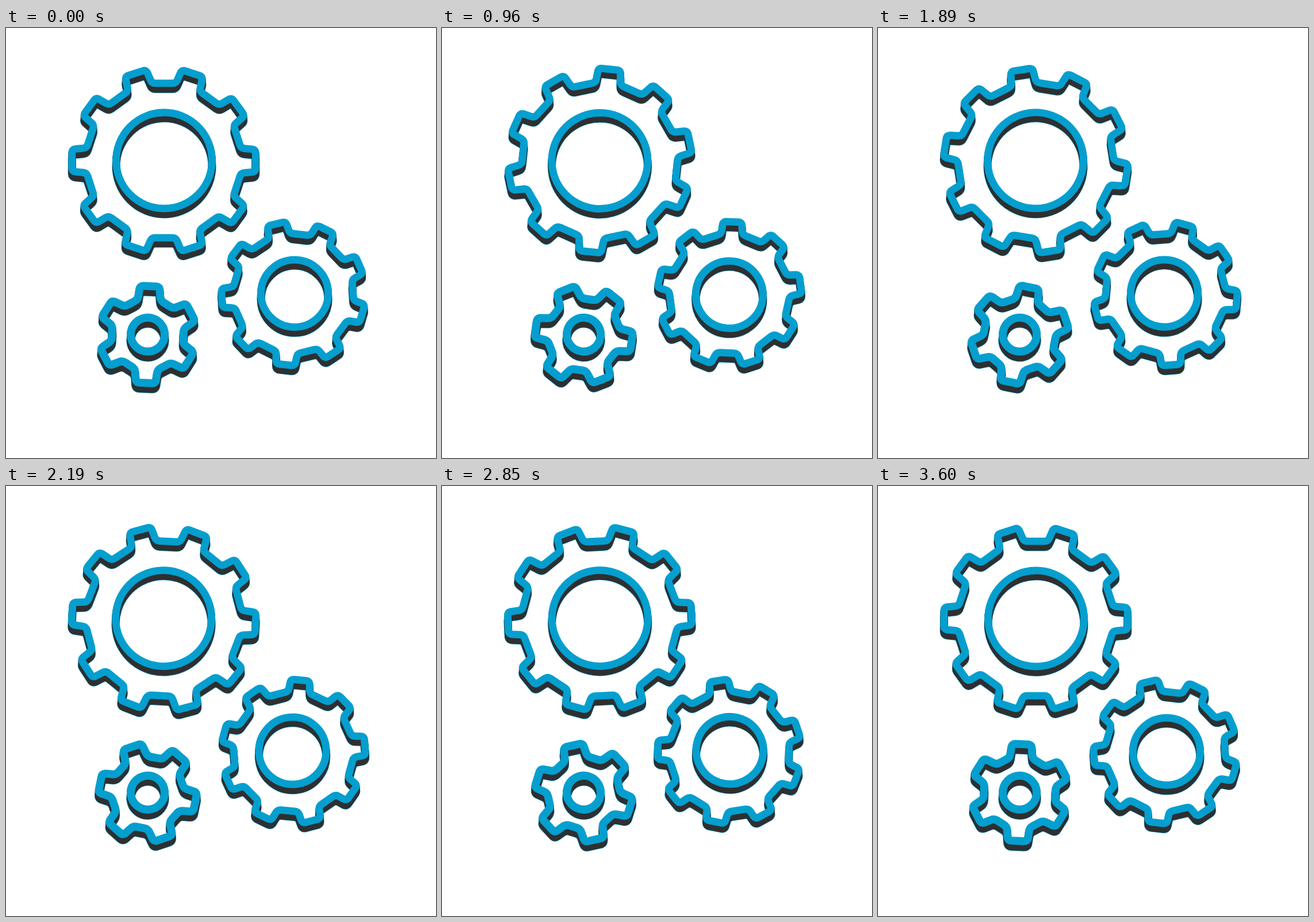
An HTML page that plays this animation: 748 by 748 pixels, repeating every 3630 ms.

```html
<!DOCTYPE html>
<html lang="en">
<head>
<meta charset="utf-8">
<title>Gears</title>
<style>
  html, body { margin: 0; width: 100%; height: 100%; overflow: hidden; background: #fff; }
  svg { display: block; width: 100vw; height: 100vh; }
</style>
</head>
<body>
<svg id="stage" viewBox="0 0 748 748" fill="none" stroke-linejoin="round"></svg>
<script>
const NS = 'http://www.w3.org/2000/svg';
const BLUE = '#049fcf', DARK = '#2f2f30';
const STEP = 30, LOOP = 3630, DEPTH = 10, ROUND = 6, RIM = 0.7;

// tip and base: [distance along the tooth axis, half width]
const gears = [
  { x: 274.5, y: 230.5, teeth: 10, phase: -17.9, tip: [159.7, 19.2], base: [134.2, 21.7],
    line: 12.8, ring: 83.5, ringLine: 12.8, off: 0.5 },
  { x: 500, y: 461.8, teeth: 9, phase: -13.6, tip: [124.7, 16.4], base: [103.3, 18.5],
    line: 12.8, ring: 58.5, ringLine: 13, off: 2 },
  { x: 246.5, y: 533.3, teeth: 6, phase: 2.4, tip: [84.2, 17], base: [60.2, 19.8],
    line: 13.8, ring: 29.5, ringLine: 14, off: 0 }
];

// layers from back to front: [colour, dx, dy]
const layers = [[BLUE, -RIM, DEPTH], [BLUE, RIM, DEPTH], [BLUE, 0, DEPTH + RIM]];
for (let dy = DEPTH; dy > 0; dy -= 2) layers.push([DARK, 0, dy]);
layers.push([BLUE, 0, 0]);

const stage = document.getElementById('stage');

function add(parent, tag, attrs) {
  const el = document.createElementNS(NS, tag);
  for (const key in attrs) el.setAttribute(key, attrs[key]);
  return parent.appendChild(el);
}

const text = p => p.map(v => v.toFixed(2)).join(' ');

// the point a fixed distance from a towards b
function toward(a, b, dist) {
  const k = dist / Math.hypot(b[0] - a[0], b[1] - a[1]);
  return [a[0] + (b[0] - a[0]) * k, a[1] + (b[1] - a[1]) * k];
}

function roundedLoop(points) {
  const n = points.length;
  const corners = points.map((p, i) => {
    const from = toward(p, points[(i + n - 1) % n], ROUND);
    const to = toward(p, points[(i + 1) % n], ROUND);
    return `${text(from)}Q${text(p)} ${text(to)}`;
  });
  return 'M' + corners.join('L') + 'Z';
}

function outline({ teeth, phase, tip, base }) {
  const points = [];
  for (let i = 0; i < teeth; i++) {
    const a = (phase + i * 360 / teeth) * Math.PI / 180;
    const sin = Math.sin(a), cos = Math.cos(a);
    const put = (r, w) => points.push([r * sin + w * cos, w * sin - r * cos]);
    put(base[0], -base[1]);
    put(tip[0], -tip[1]);
    put(tip[0], tip[1]);
    put(base[0], base[1]);
  }
  return roundedLoop(points);
}

const defs = add(stage, 'defs', {});
gears.forEach((gear, i) => {
  const id = 'gear' + i;
  const holder = add(defs, 'g', { id });
  gear.body = add(holder, 'g', {});
  add(gear.body, 'path', { d: outline(gear), 'stroke-width': gear.line });
  add(gear.body, 'circle', { cx: gear.off, r: gear.ring, 'stroke-width': gear.ringLine });
  for (const [stroke, x, y] of layers) add(stage, 'use', { href: '#' + id, stroke, x, y });
});

function draw(ms) {
  const t = Math.floor((ms % LOOP) / STEP) * STEP;
  for (const { body, x, y } of gears) {
    body.setAttribute('transform', `translate(${x} ${y}) rotate(${t / 10})`);
  }
}

const start = performance.now();
function tick() {
  draw(performance.now() - start);
  requestAnimationFrame(tick);
}
draw(0);
requestAnimationFrame(tick);
</script>
</body>
</html>
```
